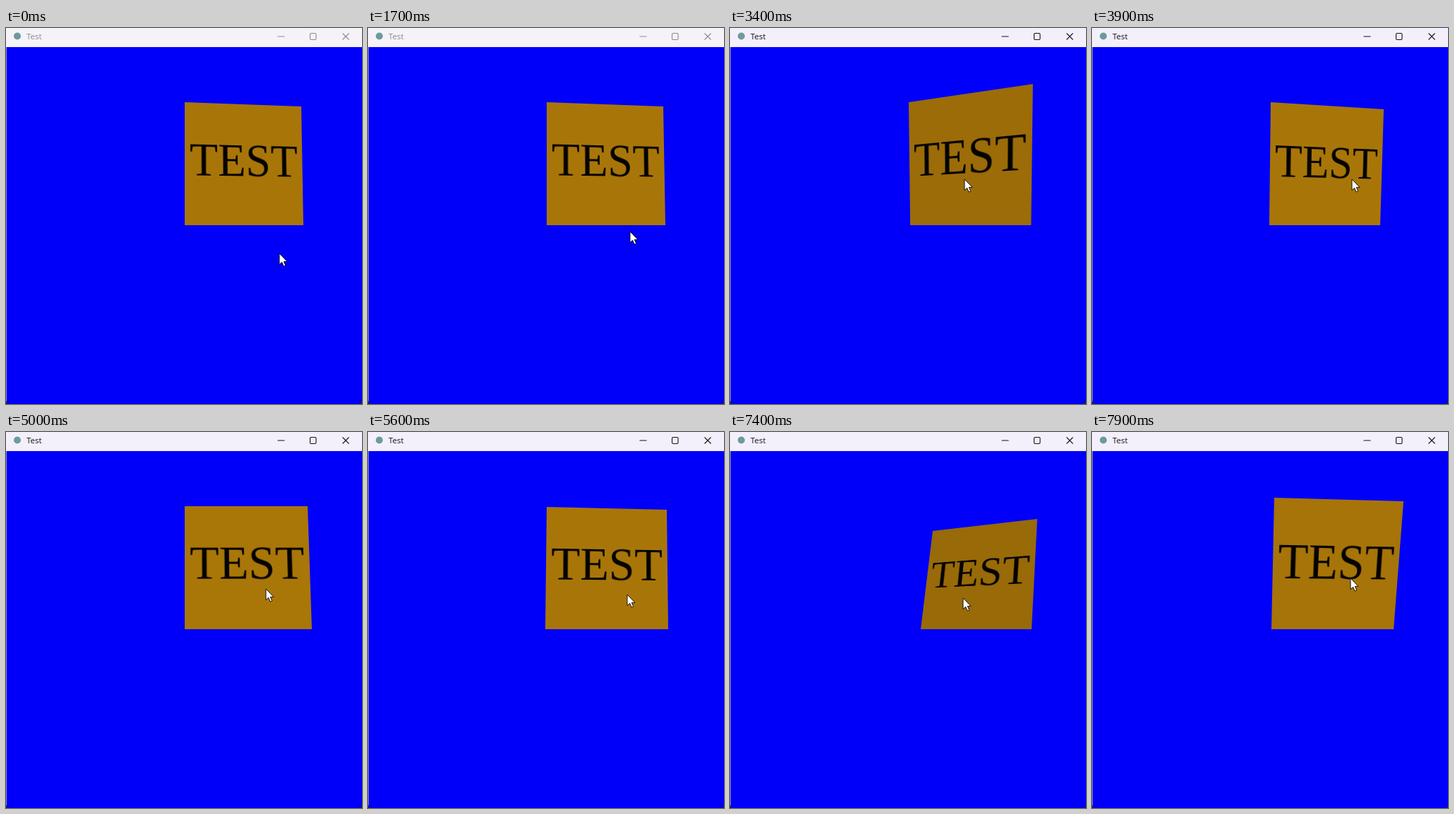
An HTML page that plays this animation: 504 by 532 pixels, repeating every 8 s.

```html
<!DOCTYPE html>
<html lang="en">
<head>
<meta charset="utf-8">
<title>Test</title>
<style>
  html, body { margin: 0; width: 100%; height: 100%; overflow: hidden; background: #0000fa; }
  svg { position: absolute; left: 0; top: 0; display: block; }
  #panel { position: absolute; left: 0; top: 0; width: 174px; height: 174px; transform-origin: 0 0; }
  #panel text { font: 67px "Liberation Serif", "Times New Roman", serif; text-anchor: middle; fill: #050300; }
  #caption { font: 11.5px "Open Sans", sans-serif; }
</style>
</head>
<body>
<svg width="504" height="532">
  <rect width="504" height="532" fill="#0000fa"/>
  <rect id="bar" width="504" height="27"/>
  <rect y="27" width="1" height="505" fill="#8c8cb4"/>
  <path d="M0 527Q1 531 5 532H0ZM504 527Q503 531 499 532H504Z" fill="#20203c"/>
  <circle cx="16" cy="11.5" r="5" fill="#6d9a9c"/>
  <text id="caption" x="29" y="16">Test</text>
  <g id="buttons" fill="none" stroke-width="1.1">
    <path d="M384.5 12H394.5M476.5 7.5L485.5 16.5M485.5 7.5L476.5 16.5"/>
    <rect x="430.5" y="7.5" width="8.5" height="9" rx="1.5"/>
  </g>
</svg>
<div id="panel"><svg width="174" height="174"><text x="87" y="104.5">TEST</text></svg></div>
<svg width="504" height="532">
  <path id="cursor" d="M0 0V15.6L3.6 12.3L6.1 18L8.7 16.9L6.3 11.4H11Z" fill="#fff" stroke="#000" stroke-width="0.9"/>
</svg>
<script>
const LOOP = 8000, STEP = 100, SIZE = 174, FLOOR = 279, CLICK = 2500;
const $ = id => document.getElementById(id);

// time, cursor tip x, y
const cursorKeys = [
  [0, 387, 319], [600, 387, 319], [1300, 385, 314], [1500, 385, 314],
  [2200, 337, 222], [2500, 345, 215], [2900, 323, 216], [3300, 325, 214],
  [3900, 368, 214], [4400, 373, 210], [5000, 368, 222], [5600, 367, 230],
  [5800, 367, 230], [6500, 380, 210], [6800, 385, 214], [7400, 330, 235],
  [7900, 366, 207]
];

// time, top-left x, y, top-right x, y, bottom-right x, bottom-left x, shade
const panelKeys = [
  [0, 253, 105, 418, 111, 421, 253, 168],
  [2500, 253, 105, 418, 111, 421, 253, 168],
  [2900, 253, 105, 427, 74, 428, 256, 152],
  [3300, 253, 105, 432, 72, 430, 256, 152],
  [3900, 253, 105, 413, 115, 408, 251, 168],
  [4400, 250, 95, 426, 109, 421, 249, 166],
  [5000, 253, 105, 427, 105, 433, 253, 169],
  [5600, 253, 106, 423, 110, 425, 251, 168],
  [5800, 253, 106, 423, 110, 425, 251, 168],
  [6500, 276, 79, 443, 100, 427, 265, 160],
  [6800, 281, 78, 456, 104, 428, 269, 158],
  [7400, 287, 140, 435, 123, 427, 270, 152],
  [7900, 258, 93, 441, 98, 427, 254, 166]
];

function sample(keys, t) {
  const next = keys.findIndex(k => k[0] > t);
  if (next < 0) return keys[keys.length - 1].slice(1);
  const a = keys[next - 1], b = keys[next];
  const p = (t - a[0]) / (b[0] - a[0]);
  return a.slice(1).map((v, i) => v + (b[i + 1] - v) * p);
}

// Perspective matrix that maps the square panel onto four corners
function project(x0, y0, x1, y1, x2, y2, x3, y3) {
  const ax = x1 - x2, ay = y1 - y2, bx = x3 - x2, by = y3 - y2;
  const sx = x0 - x1 + x2 - x3, sy = y0 - y1 + y2 - y3;
  const det = ax * by - bx * ay;
  const g = (sx * by - bx * sy) / det, h = (ax * sy - sx * ay) / det;
  const u = [x1 - x0 + g * x1, y1 - y0 + g * y1, 0, g].map(v => v / SIZE);
  const v = [x3 - x0 + h * x3, y3 - y0 + h * y3, 0, h].map(n => n / SIZE);
  const all = [...u, ...v, 0, 0, 1, 0, x0, y0, 0, 1];
  return `matrix3d(${all.map(n => n.toFixed(9)).join(",")})`;
}

function draw(now) {
  const t = Math.floor((now % LOOP) / STEP) * STEP;
  const active = t >= CLICK;
  $("bar").setAttribute("fill", active ? "#f3f0fb" : "#f5f3f8");
  $("caption").setAttribute("fill", active ? "#111" : "#8a8a8e");
  $("buttons").setAttribute("stroke", active ? "#111" : "#89898d");

  const [lx, ly, rx, ry, brx, blx, shade] = sample(panelKeys, t);
  $("panel").style.transform = project(lx, ly, rx, ry, brx, FLOOR, blx, FLOOR);
  $("panel").style.background = `rgb(${shade}, ${shade * 0.7}, 8)`;

  const [cx, cy] = sample(cursorKeys, t).map(Math.round);
  $("cursor").setAttribute("transform", `translate(${cx} ${cy})`);
}

const start = performance.now();
function tick() {
  draw(performance.now() - start);
  requestAnimationFrame(tick);
}
tick();
</script>
</body>
</html>
```
